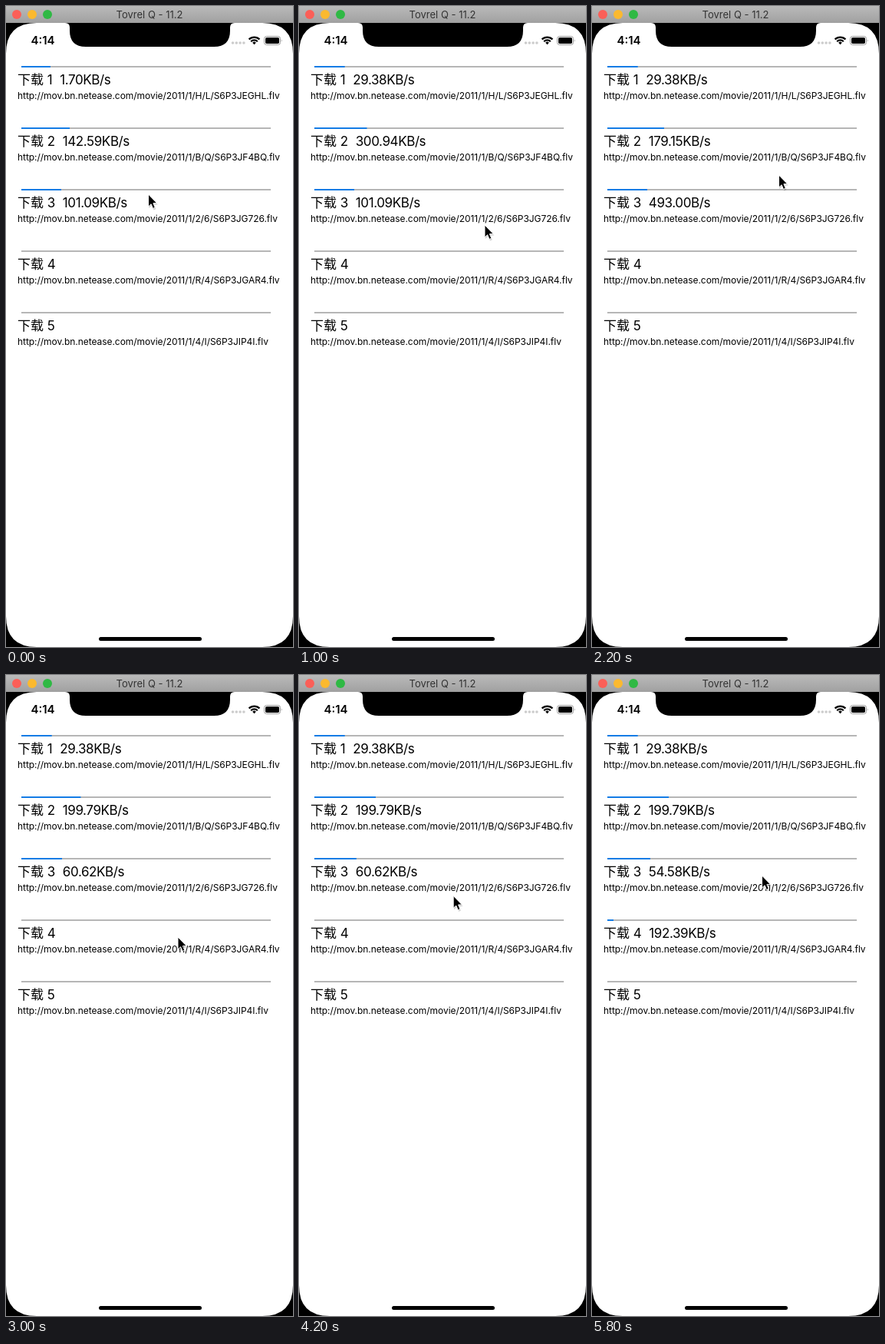
An HTML page for the animation above (6 s loop, 374 by 834 pixels).

```html
<!DOCTYPE html>
<html lang="zh-CN">
<head>
<meta charset="utf-8">
<title>Downloads</title>
<style>
html, body { margin: 0; width: 100%; height: 100%; overflow: hidden; background: #000; }
svg { display: block; }
text { font-family: Inter, "Noto Sans CJK SC", "Noto Sans CJK", sans-serif; white-space: pre; }
.name { font-size: 17px; }
.speed { letter-spacing: -.4px; }
.url { font-size: 12px; letter-spacing: -.05px; }
</style>
</head>
<body>
<svg width="374" height="834" viewBox="0 0 374 834">
  <defs>
    <linearGradient id="bar" x2="0" y2="1">
      <stop stop-color="#bababa"/><stop offset="1" stop-color="#a0a0a0"/>
    </linearGradient>
  </defs>
  <rect width="374" height="834"/>
  <rect width="374" height="22" fill="url(#bar)"/>
  <circle cx="14" cy="11" r="6" fill="#fb5f58"/>
  <circle cx="34" cy="11" r="6" fill="#fbb92f"/>
  <circle cx="54" cy="11" r="6" fill="#2fb944"/>
  <text x="187" y="16" font-size="13" text-anchor="middle" fill="#333">Tovrel Q - 11.2</text>

  <path fill="#fff" d="M40 22H77Q83 22 83 28V32Q83 53 104 53H271Q292 53 292 32V28Q292 22 298 22H334Q374 22 374 62V794Q374 834 334 834H40Q0 834 0 794V62Q0 22 40 22Z"/>
  <text x="32.5" y="50" font-size="15" font-weight="600">4:14</text>
  <path d="M295.5 48H313" stroke="#ccc" stroke-width="3.6" stroke-linecap="round" stroke-dasharray="0 4.8"/>
  <g fill="none" stroke="#000" stroke-width="2.3">
    <path d="M316.6 43.4A9.8 9.8 0 0 1 330.4 43.4M319.2 46.2A6 6 0 0 1 327.8 46.2"/>
    <path d="M321.2 47.7A3.3 3.3 0 0 1 325.8 47.7L323.5 50.2Z" fill="#000" stroke="none"/>
  </g>
  <rect x="336.5" y="39.5" width="21" height="11" rx="3" fill="none" stroke="#999"/>
  <rect x="338" y="41" width="18" height="8" rx="1.8"/>
  <path d="M358.8 43.2Q360.6 45 358.8 46.8Z" fill="#999"/>

  <g id="rows"></g>
  <rect x="121" y="821" width="134" height="5" rx="2.5"/>
  <g id="cursor">
    <path d="M0 1V17L3.7 13.6 6.2 19.4 9 18.2 6.5 12.6H11.6Z" fill="#000" opacity=".18" transform="translate(.8 1)"/>
    <path d="M0 0V16L3.6 12.7 6 18.4 8.8 17.2 6.4 11.6H11.3Z" stroke="#fff" stroke-width="1" stroke-linejoin="round"/>
  </g>
</svg>
<script>
const STEP = 200, STEPS = 30;

// bar: [step, end x], eased linearly; speed: [step, label], held until the next one
const rows = [
  { path: 'H/L/S6P3JEGHL', bar: [[0, 58], [3, 59.7]],
    speed: [[0, '1.70KB/s'], [2, '16.86KB/s'], [5, '29.38KB/s']] },
  { path: 'B/Q/S6P3JF4BQ', bar: [[0, 83], [3, 87], [7, 90], [11, 94], [18, 100]],
    speed: [[0, '142.59KB/s'], [2, '300.94KB/s'], [6, '215.80KB/s'], [10, '179.15KB/s'], [15, '199.79KB/s']] },
  { path: '2/6/S6P3JG726', bar: [[0, 72], [11, 72], [19, 74], [24, 76]],
    speed: [[0, '101.09KB/s'], [11, '493.00B/s'], [15, '60.62KB/s'], [22, '99.84KB/s'], [27, '54.58KB/s']] },
  { path: 'R/4/S6P3JGAR4', bar: [[0, 20], [22, 20], [24, 24], [29, 28]],
    speed: [[0, ''], [23, '152.40KB/s'], [27, '192.39KB/s']] },
  { path: '4/I/S6P3JIP4I', bar: [[0, 20]], speed: [[0, '']] }
];

const pointer = [
  [0, 185.5, 245], [3, 249.5, 240], [5, 242, 285], [7, 223.5, 236], [9, 234, 285],
  [11, 243.5, 220], [15, 224, 341], [19, 201.5, 190], [22, 201, 336], [24, 201.5, 258],
  [26, 210, 404], [28, 216, 184], [29, 221.5, 261]
];

const held = (keys, s) => keys.filter(k => k[0] <= s).pop();

function between(keys, s) {
  const a = held(keys, s), b = keys.find(k => k[0] > s) || a;
  const p = a === b ? 0 : (s - a[0]) / (b[0] - a[0]);
  return a.slice(1).map((v, i) => v + (b[i + 1] - v) * p);
}

const list = document.getElementById('rows'), cursor = document.getElementById('cursor');
list.innerHTML = rows.map((row, i) => `<g transform="translate(0 ${i * 80})">
  <rect x="20" y="78" width="325" height="2" fill="#b6b6b6"/>
  <rect class="fill" x="20" y="78" height="2" fill="#147ce5"/>
  <text class="name" x="15" y="102">下载 ${i + 1}  <tspan class="speed"></tspan></text>
  <text class="url" x="15" y="121">http://mov.bn.netease.com/movie/2011/1/${row.path}.flv</text></g>`).join('');
const fills = list.querySelectorAll('.fill'), speeds = list.querySelectorAll('.speed');

const start = performance.now();
function draw() {
  const s = Math.floor((performance.now() - start) / STEP) % STEPS;
  rows.forEach((row, i) => {
    fills[i].setAttribute('width', between(row.bar, s)[0] - 20);
    speeds[i].textContent = held(row.speed, s)[1];
  });
  cursor.setAttribute('transform', `translate(${between(pointer, s)})`);
  requestAnimationFrame(draw);
}
draw();
</script>
</body>
</html>
```
